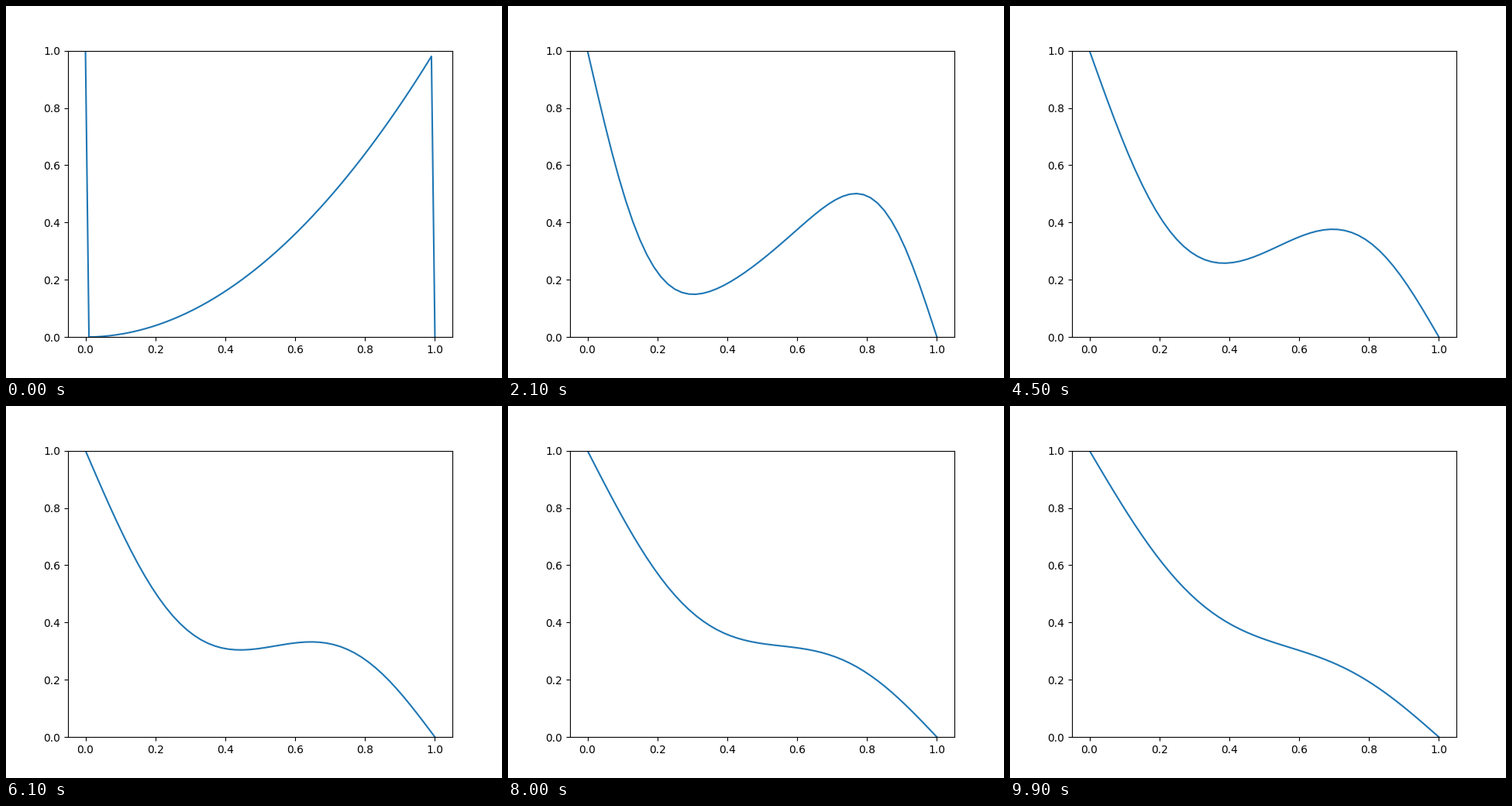
These frames come from a looping animation (640 by 480 pixels, 10000 ms). A matplotlib script:

```python
import numpy as np
import matplotlib.pyplot as plt
from matplotlib.animation import FuncAnimation

CELLS = 50
FRAMES = 100
DT = 0.0005
LEFT, RIGHT = 1.0, 0.0

dx = 1 / CELLS
centers = (np.arange(CELLS) + 0.5) * dx
x = np.concatenate(([0], centers, [1]))

# Finite-volume Laplacian with fixed values on both outer faces
lap = -2 * np.eye(CELLS) + np.eye(CELLS, k=1) + np.eye(CELLS, k=-1)
lap[0, 0] = lap[-1, -1] = -3
rates, modes = np.linalg.eigh(lap / dx**2)

steady = LEFT + (RIGHT - LEFT) * centers
weights = modes.T @ (centers**2 - steady)


def profile(t):
    u = steady + modes @ (weights * np.exp(rates * t))
    return np.concatenate(([LEFT], u, [RIGHT]))


fig, ax = plt.subplots(figsize=(6.4, 4.8), dpi=100)
line, = ax.plot(x, profile(0))
ax.set_xlim(-0.05, 1.05)
ax.set_ylim(0, 1)


def update(i):
    line.set_ydata(profile(i * DT))
    return line,


anim = FuncAnimation(fig, update, frames=FRAMES, interval=100,
                     repeat=True, repeat_delay=0)
plt.show()
```
